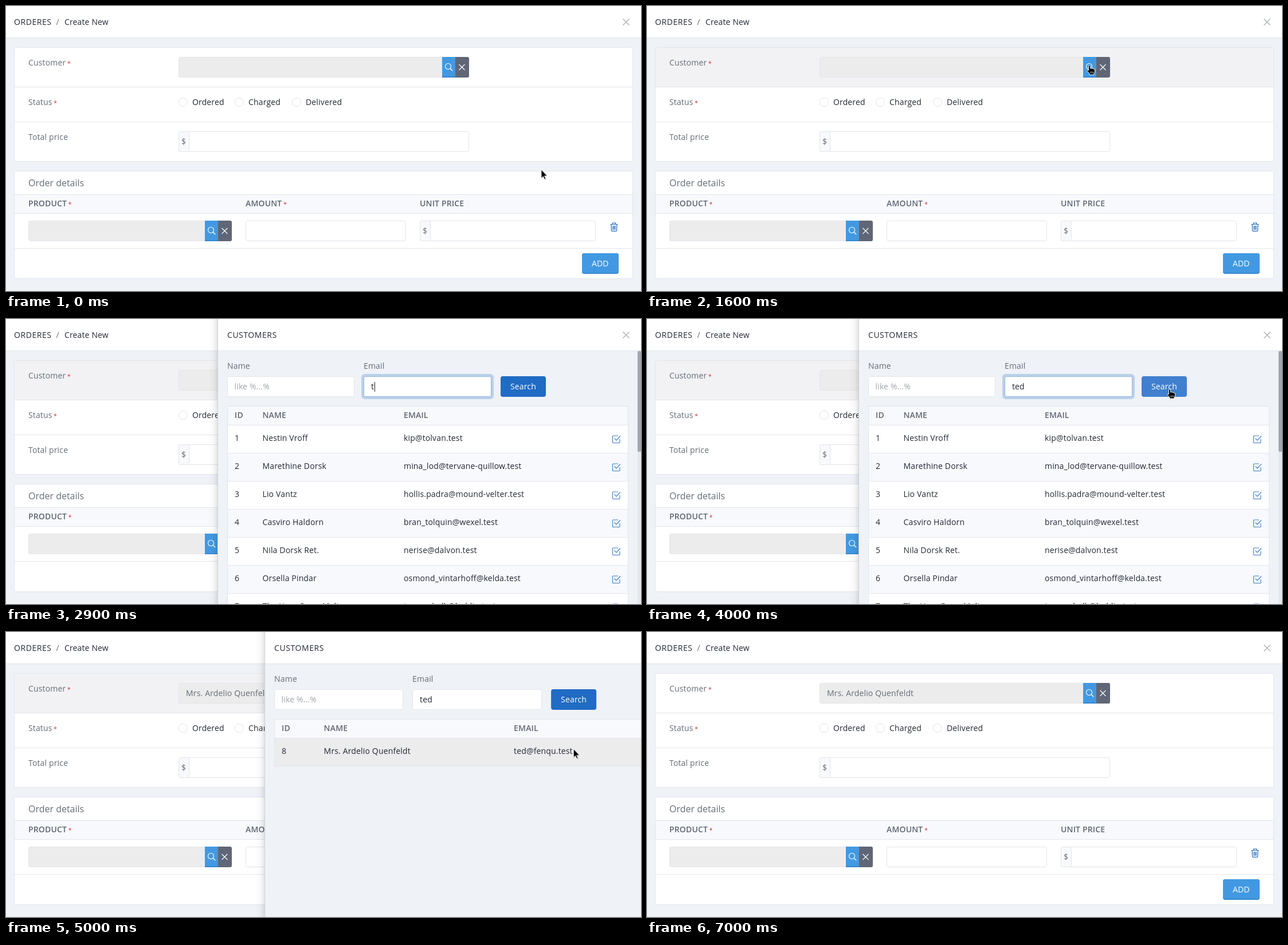
Recreate the animation shown at these times as an HTML page. Size 1108 by 498 pixels, loop 7100 ms.

```html
<!DOCTYPE html>
<html lang="en">
<head>
<meta charset="utf-8">
<title>Create order</title>
<style>
html, body { margin: 0; height: 100%; overflow: hidden; background: #eff2f7 }
svg { display: block; width: 1108px; height: 498px; font: 14px "Open Sans", "Noto Sans", sans-serif; letter-spacing: .15px; fill: none }
text { fill: #232936; white-space: pre }
.label { fill: #656d77 }
.head { fill: #5f6672; font-weight: 600 }
.title { fill: #656d77; font-size: 16px; letter-spacing: 0 }
.caps { letter-spacing: .55px }
.hint { fill: #a0a5ac }
.white { fill: #fff }
.star { fill: #d63939; font-size: 11px; font-weight: 400 }
</style>
</head>
<body>
<svg id="stage" viewBox="0 0 1108 498"></svg>
<script>
const LOOP = 7100, STEP = 100;
const LINE = '#e2e5eb', TINT = '#f8f9fc', PAGE = '#eff2f7', BLUE = '#206bc4';
const CHOSEN = 'Mrs. Ardelio Quenfeldt';
const CUSTOMERS = [
  ['Nestin Vroff', 'kip@tolvan.test'],
  ['Marethine Dorsk', 'mina_lod@tervane-quillow.test'],
  ['Lio Vantz', 'hollis.padra@mound-velter.test'],
  ['Casviro Haldorn', 'bran_tolquin@wexel.test'],
  ['Nila Dorsk Ret.', 'nerise@dalvon.test'],
  ['Orsella Pindar', 'osmond_vintarhoff@kelda.test'],
  ['The Hon. Quen Malto', 'tarven_balk@holdin.test']
];
// time, x, y of the pointer
const PATH = [
  [0, 934, 286], [600, 934, 286], [800, 868, 214], [1100, 749, 83], [1400, 772, 104],
  [1900, 772, 104], [2100, 778, 111], [3300, 778, 111], [3900, 912, 123], [4200, 912, 123],
  [4600, 1072, 215], [4900, 1072, 215], [5600, 500, 141], [6200, 470, 520]
];

const clamp = v => Math.max(0, Math.min(1, v));
const inside = (p, x, y, w, h) => p.x >= x && p.x < x + w && p.y >= y && p.y < y + h;

const text = (x, y, s, cls = '') => `<text x="${x}" y="${y}" class="${cls}">${s}</text>`;
const required = (x, y, s, cls) => text(x, y, s + '<tspan class="star" dx="2.5">*</tspan>', cls);
const fill = (x, y, w, h, color, r = 0) =>
  `<rect x="${x}" y="${y}" width="${w}" height="${h}" rx="${r}" fill="${color}"/>`;
const box = (x, y, w, h, color = '#fff', r = 3, edge = LINE) =>
  `<rect x="${x + .5}" y="${y + .5}" width="${w - 1}" height="${h - 1}" rx="${r}" fill="${color}" stroke="${edge}"/>`;
const rule = (x, y, w) => fill(x, y, w, 1, LINE);
const stroke = (d, color, width = 1.1) => `<path d="${d}" stroke="${color}" stroke-width="${width}"/>`;
const at = (x, y, s) => `<g transform="translate(${x} ${y})">${s}</g>`;

const cross = (x, y, r, color, width) => at(x, y, stroke(`M${-r} ${-r}L${r} ${r}M${r} ${-r}L${-r} ${r}`, color, width));
const tick = (x, y) => at(x, y, stroke(
  'M6 0V5.5a1 1 0 0 1-1 1H-5.5a1 1 0 0 1-1-1V-5a1 1 0 0 1 1-1H3M-3.5-1.5L0 2 7-5.5', '#3d7cc9'));

function lookup(x, y, w, value) {
  const right = x + w;
  return box(x, y, w, 36, '#ececec') + text(x + 13, y + 23, value, 'label') +
    fill(right - 47, y, 24, 36, '#4299e1') + fill(right - 47, y + 34.5, 24, 1.5, '#2f7fc6') +
    `<path d="M${right - 24} ${y}h21a3 3 0 0 1 3 3v30a3 3 0 0 1-3 3h-21z" fill="#606676"/>` +
    at(right - 36, y + 17, '<circle cx="-.5" cy="-.5" r="5" stroke="#fff" stroke-width="1.1"/>' + stroke('M3 3L7.3 7.3', '#fff', 1.3)) +
    cross(right - 12.5, y + 18, 5, '#fff', 1.1);
}

const money = (x, y, w) => box(x, y, w, 36) +
  box(x, y, 19, 36, TINT) + text(x + 5, y + 23, '$', 'label');

function page(row, customer) {
  const tops = [73, 142, 203, 271];
  let s = fill(0, 0, 1108, 498, PAGE) + fill(0, 0, 1108, 55, '#fff') + rule(0, 55, 1108) +
    text(14, 33, 'ORDERES', 'caps') + text(87.5, 33, '/', 'label') + text(102, 33, 'Create New') +
    cross(1082, 28, 5.5, '#a9adb5', 1.4) + box(14, 72, 1080, 200);
  if (row >= 0) s += fill(15, tops[row], 1078, tops[row + 1] - tops[row] - 1, '#f2f2f4');
  s += rule(15, 141, 1078) + rule(15, 202, 1078) +
    required(39, 104, 'Customer', 'label') + required(39, 173, 'Status', 'label') +
    text(39, 234, 'Total price', 'label') + lookup(301, 89, 507, customer);
  for (const [x, name] of [[309, 'Ordered'], [407, 'Charged'], [507, 'Delivered']])
    s += `<circle cx="${x}" cy="168" r="7.5" fill="#fff" stroke="${LINE}"/>` + text(x + 16, 173, name);
  s += money(301, 219, 507) +
    box(14, 288, 1080, 189) + text(39, 315, 'Order details', 'title') +
    fill(15, 329, 1078, 34, TINT) + rule(15, 329, 1078) + rule(15, 362, 1078) + rule(15, 423, 1078) +
    required(39, 350, 'PRODUCT', 'head') + required(418, 350, 'AMOUNT', 'head') + text(722, 350, 'UNIT PRICE', 'head') +
    lookup(39, 375, 355, '') + box(418, 375, 280, 36) + money(722, 375, 307) +
    at(1061, 386, stroke('M-6.5-4.5H6.5M-2.5-5V-7H2.5V-5M-5-4L-4.5 6.5Q-4.4 7.3-3.6 7.3H3.6Q4.4 7.3 4.5 6.5L5-4M-2-2V5M0-2V5M2-2V5', BLUE, 1.2)) +
    fill(1005, 432, 64, 36, '#2f7fc6', 4) + fill(1005, 432, 64, 34.5, '#4299e1', 4) + text(1022, 455, 'ADD', 'white');
  return s;
}

function drawer(t, p) {
  const found = t >= 4300, focused = t >= 2500 && !found;
  const typed = 'ted'.slice(0, t < 2800 ? 0 : t < 3000 ? 1 : t < 3200 ? 2 : 3);
  const [mailX, nameW, mailW, goX, tableW] = found ? [627, 225, 226, 869, 708] : [624, 222, 223, 863, 700];
  const [nameCol, mailCol, tickX] = found ? [472.5, 804, 1073] : [447.5, 694, 1065];
  const hover = !found && inside(p, goX, 100, 79, 36);
  let s = fill(369, 0, 739, 498, PAGE) + fill(369, 0, 739, 55, '#fff') + rule(369, 55, 739) +
    text(386, 33, 'CUSTOMERS', 'caps') + cross(1082, 28, 5.5, '#a9adb5', 1.4) +
    text(386, 87, 'Name', 'label') + text(mailX, 87, 'Email', 'label') +
    box(386, 100, nameW, 36) + text(398.5, 123, 'like %...%', 'hint');
  if (focused) s += fill(mailX - 4, 96, mailW + 8, 44, '#bbd0ea', 6);
  s += box(mailX, 100, mailW, 36, '#fff', 3, focused ? '#90b5e2' : LINE) +
    (typed ? text(mailX + 13, 123, typed) : text(mailX + 13, 123, 'like ...%', 'hint'));
  if (focused && Math.floor((t - 2500) / 500) % 2 === 0)
    s += fill(mailX + 13 + [0, 6, 14, 23][typed.length], 110, 1, 17, '#1e2433');
  s += fill(goX, 100, 79, 36, hover ? '#4080cf' : BLUE, 4) + text(goX + 17, 123, 'Search', 'white') +
    fill(386, 152, tableW, 34, TINT) + rule(386, 152, tableW) +
    text(399, 173, 'ID', 'head') + text(nameCol, 173, 'NAME', 'head') + text(mailCol, 173, 'EMAIL', 'head');
  const rows = found ? [[CHOSEN, 'ted@fenqu.test']] : CUSTOMERS;
  rows.forEach(([name, mail], i) => {
    const y = 186 + 49 * i, over = inside(p, 386, y, tableW, 49);
    s += rule(386, y - 1, tableW) + fill(386, y, tableW, 48, over ? '#ececed' : i % 2 ? TINT : '#fff') +
      text(399, y + 27, found ? 8 : i + 1) + text(nameCol, y + 27, name) + text(mailCol, y + 27, mail) +
      tick(tickX, y + 24) + rule(386, y + 48, tableW);
  });
  const bottom = found ? 235 : 500;
  s += fill(386, 152, 1, bottom - 152, LINE) + fill(385 + tableW, 152, 1, bottom - 152, LINE);
  if (!found) s += fill(1102, 56, 6, 442, '#e4e7ec') + fill(1102, 56, 6, 176, '#a3a6ad', 2);
  return s;
}

function pointer(t) {
  const i = PATH.findIndex(k => k[0] > t);
  if (i < 0) return { x: 470, y: 600 };
  const [t0, x0, y0] = PATH[i - 1], [t1, x1, y1] = PATH[i], k = (t - t0) / (t1 - t0);
  return { x: x0 + (x1 - x0) * k, y: y0 + (y1 - y0) * k };
}

const ARROW = '<path d="M1 1.5V16L4.3 12.9 6.6 18 8.8 17 6.5 12.1 11 11.9z" fill="#000" opacity=".2"/>' +
  '<path d="M0 0V14.8L3.3 11.7 5.6 16.8 7.8 15.8 5.5 10.9 10.2 10.7z" fill="#000" stroke="#fff" stroke-width=".8"/>';
const BEAM_PATH = 'M-3-6.5Q0-6.5 0-4.5Q0-6.5 3-6.5M0-5V6M-3 7.5Q0 7.5 0 5.5Q0 7.5 3 7.5M-1.5 2.5H1.5';
const BEAM = stroke(BEAM_PATH, '#fff', 2.6) + stroke(BEAM_PATH, '#111', 1.1);
const HAND = '<path d="M-1.5 .5Q0-1 1.5 .5V5Q3 4 4.3 5.3Q6 4.6 7 6Q9.5 5.6 9.5 8V11L8 14V16H0V14L-4 9.5Q-4.5 7.3-1.5 8.5z" fill="#000" stroke="#fff" stroke-width=".9"/>' +
  stroke('M2 10.5V13.5M4.2 10.5V13.5M6.4 10.5V13.5', '#fff', .8);

function cursor(t, p, open) {
  if (t >= 2800 && t < 3300) return '';
  const hand = open
    ? inside(p, 863, 100, 79, 36) || (t >= 4300 && inside(p, 1064, 202, 18, 18))
    : inside(p, 761, 89, 47, 36);
  const beam = open ? inside(p, 624, 100, 223, 36) : inside(p, 320, 219, 488, 36);
  return at(p.x, p.y, hand ? HAND : beam ? BEAM : ARROW);
}

function scene(t) {
  const p = pointer(t), open = t >= 2000 && t < 5000;
  const into = 1 - (1 - clamp((t - 1700) / 300)) ** 2, away = clamp((t - 4900) / 300) ** 2;
  const shown = into - away;
  const row = t >= 1700 && t < 5200 ? 0 : [73, 141, 203].findIndex((y, i) =>
    inside(p, 15, y, 1078, [68, 62, 68][i]));
  let s = page(row, t >= 5000 ? CHOSEN : '');
  if (shown > 0) s += at(739 * (1 - shown), 0,
    '<rect x="353" width="16" height="498" fill="url(#shade)"/>' + drawer(t, p) + fill(369, 0, 1, 498, '#cfd2d8'));
  return s + cursor(t, p, open);
}

const stage = document.getElementById('stage');
const defs = '<defs><linearGradient id="shade"><stop stop-opacity="0"/><stop offset=".6" stop-opacity=".03"/>' +
  '<stop offset="1" stop-opacity=".11"/></linearGradient></defs>';
const start = performance.now();
let last = -1;
function frame() {
  const t = Math.floor((performance.now() - start) % LOOP / STEP) * STEP;
  if (t !== last) stage.innerHTML = defs + scene(last = t);
  requestAnimationFrame(frame);
}
frame();
</script>
</body>
</html>
```
